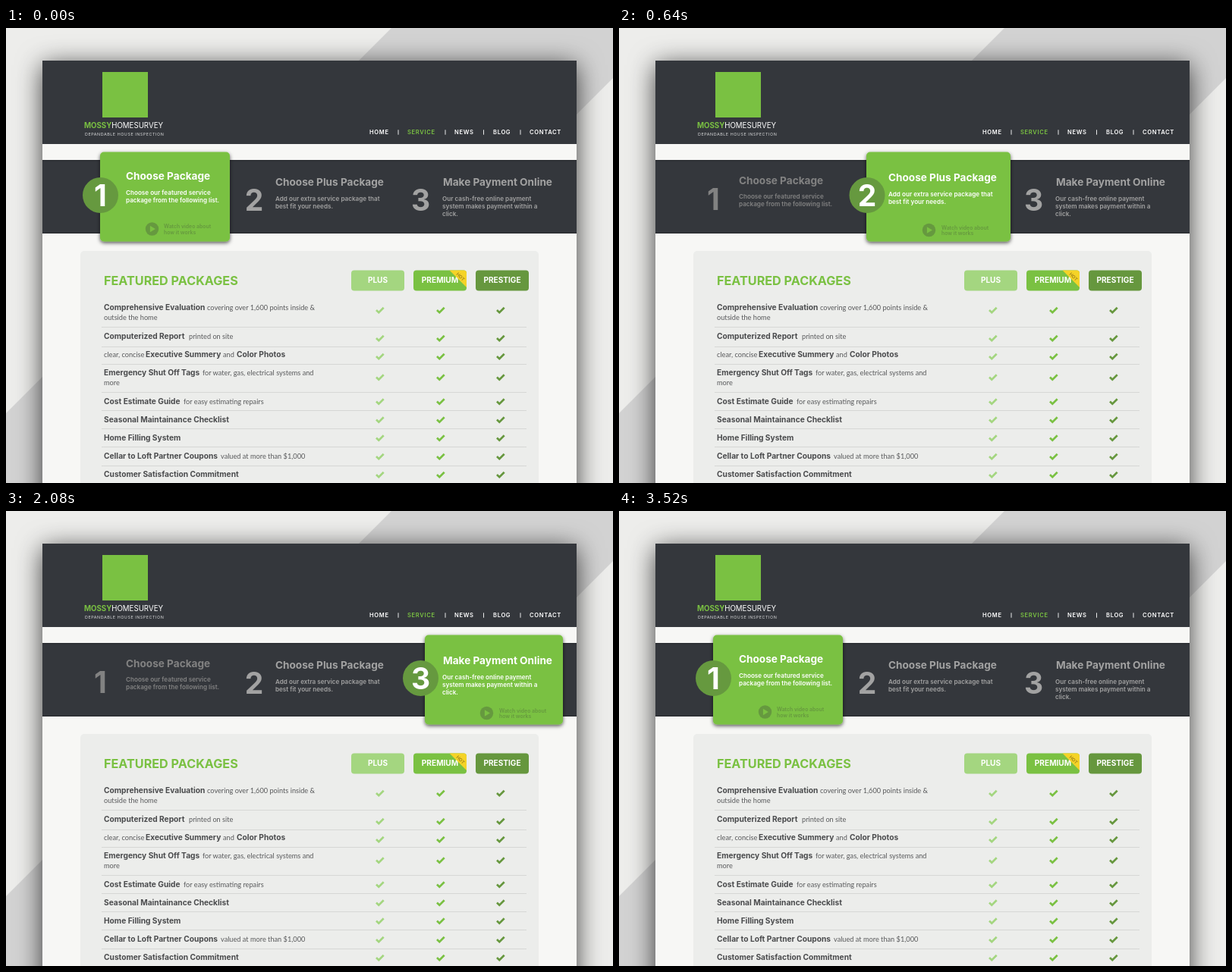
An HTML page that plays this animation: 800x600 px, repeating every 4320 ms.

```html
<!DOCTYPE html>
<html lang="en">
<head>
<meta charset="utf-8">
<title>Package steps</title>
<style>
  html, body { margin: 0; width: 100%; height: 100%; overflow: hidden; background: #ededeb; }
  svg { display: block; width: 800px; height: 600px; font-family: Inter, sans-serif; font-weight: 700; }
  .light { font: 400 9.2px Lato, sans-serif; fill: #58595b; }
  .row { font-size: 10.2px; fill: #4a4b4d; }
  .nav { font-size: 7.6px; font-weight: 600; letter-spacing: .65px; fill: #fff; }
  .digit { font-size: 39px; text-anchor: middle; }
  .title { font-size: 13.6px; }
  .desc { font-size: 8.15px; font-weight: 600; }
  .video { font-size: 6.9px; font-weight: 600; fill: #66993f; }
  .head { font-size: 10.1px; fill: #fff; text-anchor: middle; }
</style>
</head>
<body>
<svg id="stage" viewBox="0 0 800 600">
  <defs>
    <filter id="pageShadow" x="-20%" y="-20%" width="140%" height="140%">
      <feDropShadow dx="0" dy="6" stdDeviation="17" flood-opacity=".75"/>
    </filter>
    <filter id="cardShadow" x="-10%" y="-10%" width="120%" height="125%">
      <feDropShadow dx="0" dy="2" stdDeviation="2.4" flood-opacity=".65"/>
    </filter>
    <clipPath id="pageClip"><path d="M48 43h704v557H48z"/></clipPath>
  </defs>
  <path d="M0 0h800v600H0z" fill="#ededeb"/>
  <path d="M508 0H800V66L266 600H0V508z" fill="#d2d2d2"/>
  <path d="M48 43h704v640H48z" fill="#f7f7f5" filter="url(#pageShadow)"/>
  <path d="M48 43h704v110H48zM48 174h704v97H48z" fill="#34373c"/>
  <path d="M48 174h704v1.5H48zM48 269.5h704v1.5H48z" fill="#000" opacity=".18"/>

  <path d="M127 58h60v60h-60z" fill="#7ac142"/>
  <text x="103" y="132" font-size="9.7" fill="#7ac142">MOSSY<tspan fill="#fff" font-weight="400">HOMESURVEY</tspan></text>
  <text x="104" y="142" font-size="5.4" font-weight="400" letter-spacing=".54" fill="#d8d9da">DEPANDABLE HOUSE INSPECTION</text>
  <g id="nav"></g>

  <path d="M98 600V299a5 5 0 0 1 5-5H697a5 5 0 0 1 5 5V600z" fill="#ecedeb"/>
  <text x="129" y="338.6" font-size="16.2" fill="#7ac142">FEATURED PACKAGES</text>
  <g id="table"></g>
  <g id="cards" clip-path="url(#pageClip)"></g>
  <g id="steps"></g>
</svg>
<script>
const $ = id => document.getElementById(id);
const text = (cls, x, y, s, more = '') => `<text class="${cls}" x="${x}" y="${y}" ${more}>${s}</text>`;

// Static parts
const nav = [[479, 'HOME'], [529, 'SERVICE'], [591, 'NEWS'], [642, 'BLOG'], [690, 'CONTACT']];
$('nav').innerHTML =
  nav.map(([x, s]) => text('nav', x, 140.3, s, s === 'SERVICE' ? 'style="fill:#7ac142"' : '')).join('') +
  [517, 579, 629.5, 678].map(x => `<path d="M${x} 134.3v6.4" stroke="#fff" stroke-width=".9"/>`).join('');

const plans = [[455, 'PLUS', '#a4d680', 493], [537, 'PREMIUM', '#7ac142', 573], [619, 'PRESTIGE', '#66973e', 652]];
const rows = [
  ['row', 129, 372, 'Comprehensive Evaluation'],
  ['light', 265, 372, 'covering over 1,600 points inside &amp;'],
  ['light', 129, 385, 'outside the home'],
  ['row', 129, 409.5, 'Computerized Report'],
  ['light', 241, 409.5, 'printed on site'],
  ['light', 129, 433.5, 'clear, concise'],
  ['row', 184, 433.5, 'Executive Summery'],
  ['light', 286, 433.5, 'and'],
  ['row', 304, 433.5, 'Color Photos'],
  ['row', 129, 458, 'Emergency Shut Off Tags'],
  ['light', 259, 458, 'for water, gas, electrical systems and'],
  ['light', 129, 471, 'more'],
  ['row', 129, 495.5, 'Cost Estimate Guide'],
  ['light', 234, 495.5, 'for easy estimating repairs'],
  ['row', 129, 519.5, 'Seasonal Maintainance Checklist'],
  ['row', 129, 543.5, 'Home Filling System'],
  ['row', 129, 568, 'Cellar to Loft Partner Coupons'],
  ['light', 283, 568, 'valued at more than $1,000'],
  ['row', 129, 592, 'Customer Satisfaction Commitment']
];
const lines = [394.5, 420.5, 443.5, 480.5, 504.5, 528.5, 552.5, 577.5];
const checks = [372, 409, 433, 460.5, 492.5, 516.5, 540.5, 565, 589];

$('table').innerHTML =
  lines.map(y => `<path d="M126 ${y}H686" stroke="#d6d7d5"/>`).join('') +
  rows.map(r => text(...r)).join('') +
  plans.map(([x, s, color, cx]) =>
    `<rect x="${x}" y="319.6" width="70" height="27" rx="4" fill="${color}"/>` +
    text('head', x + 35, 336, s) +
    checks.map(y => `<path d="M${cx - 5} ${y}l3.3 3.2l6.4-6.4" fill="none" stroke="${color}" stroke-width="2.7"/>`).join('')
  ).join('') +
  '<path d="M584.5 319.6H603a4 4 0 0 1 4 4V342z" fill="#f5d327"/>' +
  '<text transform="translate(597.5 329.5) rotate(45)" text-anchor="middle" font-size="6" fill="#a88a1c">HOT</text>';

// Steps: resting card, grey when idle, badge, text and video positions
const steps = [
  { x: 124, w: 171, grey: 130, cx: 124.5, base: 234.5, tx: 158, ty: 200, dx: 158, dy: 219.6, vx: 192.5, vt: 239.5, vy: 265,
    title: 'Choose Package', desc: ['Choose our featured service', 'package from the following list.'] },
  { x: 326, w: 190, grey: 162, cx: 327, base: 235, tx: 355, ty: 202, dx: 355, dy: 222, vx: 408.5, vt: 456.5, vy: 266.5,
    title: 'Choose Plus Package', desc: ['Add our extra service package that', 'best fit your needs.'] },
  { x: 552, w: 182, grey: 162, cx: 546.5, base: 235, tx: 576, ty: 202, dx: 575, dy: 222, vx: 633.5, vt: 681.5, vy: 266.5,
    title: 'Make Payment Online', desc: ['Our cash-free online payment', 'system makes payment within a', 'click.'] }
];
const moves = [
  { card: [0, 450], shrink: 300, video: [240, 560] },
  { card: [100, 575], shrink: 300, video: [160, 360] },
  { card: [0, 410], shrink: 600, video: [140, 400] }
];

$('cards').innerHTML = '<rect y="163.5" height="118" rx="5" fill="#7ac142" filter="url(#cardShadow)"/>'.repeat(2);
$('steps').innerHTML = steps.map((s, i) => `
  <g><circle r="23.5" fill="#66993f"/></g>
  <g><circle r="8.7" fill="#66993f"/><path d="M-2.6-4.2L4.4 0L-2.6 4.2z" fill="#7ac142"/></g>
  <g>${text('video', -31.5, -1, 'Watch video about')}${text('video', -31.5, 6.5, 'how it works')}</g>
  <g>${text('digit', s.cx, s.base, i + 1)}${text('title', s.tx, s.ty, s.title)}${
    s.desc.map((d, j) => text('desc', s.dx, s.dy + 10 * j, d)).join('')}</g>`).join('');
const cards = $('cards').children;
const parts = $('steps').children;

const span = (t, a, b) => Math.min(1, Math.max(0, (t - a) / (b - a)));
const smooth = p => p * p * (3 - 2 * p);
const out = (p, n) => 1 - (1 - p) ** n;
const mix = (a, b, p) => a + (b - a) * p;
const place = (el, x, y, k) => {
  el.setAttribute('transform', `translate(${x} ${y}) scale(${k})`);
  el.style.display = k > 0 ? '' : 'none';
};
const setCard = (el, x, w) => { el.setAttribute('x', x); el.setAttribute('width', w); };

const LEG = 1440, LENGTH = 640, STEP = 40;

function draw(now) {
  const time = now % (3 * LEG);
  const from = Math.floor(time / LEG), to = (from + 1) % 3;
  const t = Math.floor((time - from * LEG) / STEP) * STEP;
  const move = moves[from], a = steps[from], b = steps[to];
  const u = span(t, 0, LENGTH), ease = out(u, 1.6);

  // The card runs slightly past its place, then settles; the last leg wraps around the page
  const p = smooth(span(t, ...move.card));
  const wraps = to === 0;
  const x = mix(wraps ? -126 : a.x, b.x + 3, p) - 3 * smooth(span(t, 560, LENGTH));
  setCard(cards[0], x, wraps ? b.w : mix(a.w, b.w, ease));
  setCard(cards[1], wraps ? mix(a.x, 757, smooth(span(t, 0, 485))) : 900, a.w);

  steps.forEach((s, i) => {
    const [badge, icon, label, words] = [0, 1, 2, 3].map(j => parts[4 * i + j]);
    let up = 0, white = 0, size = 0, video = 0;
    if (i === to) {
      up = size = ease;
      white = out(u, 3);
      video = span(t, ...move.video);
    } else if (i === from) {
      up = 1 - ease;
      white = 1 - smooth(u);
      size = 1 - span(t, 0, move.shrink);
      video = 1 - span(t, 0, 280);
    }
    const c = Math.round(mix(s.grey, 255, white));
    place(badge, s.cx, 220.5, size);
    place(icon, s.vx, s.vy, video);
    place(label, s.vt, s.vy, video);
    place(words, 0, 5.7 * (1 - up), 1);
    words.setAttribute('fill', `rgb(${c},${c},${c})`);
  });
}

const start = performance.now();
function tick() {
  draw(performance.now() - start);
  requestAnimationFrame(tick);
}
tick();
</script>
</body>
</html>
```
